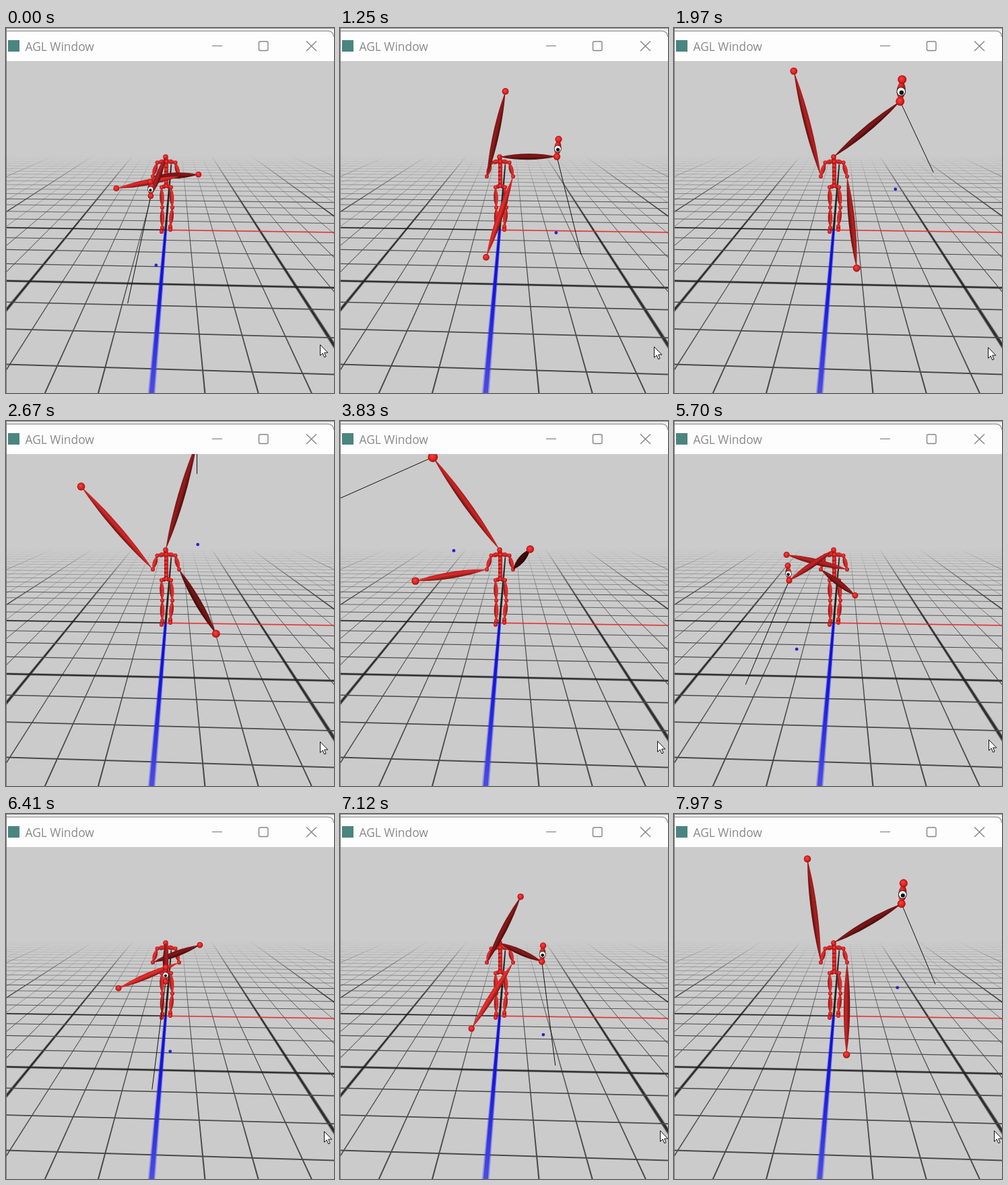
An HTML page with a canvas for the animation above (8000 ms loop, 487x541 px).

```html
<!DOCTYPE html>
<html lang="en">
<head>
<meta charset="utf-8">
<title>AGL Window</title>
<style>
  html, body { margin: 0; width: 100%; height: 100%; overflow: hidden; background: #cbcbcb; }
  canvas { display: block; }
</style>
</head>
<body>
<canvas id="stage" width="487" height="541"></canvas>
<script>
const W = 487, H = 541, TITLE_H = 49;
const LOOP = 8000, STEP = 142.5, PERIOD = 6180;
const stage = document.getElementById('stage').getContext('2d');
let ctx = stage;

const P = (x, y) => ({ x, y });

// ---------- motion: every joint runs round a circle seen in perspective ----------
// The picture holds for one STEP at a time.
const heldTime = t => Math.floor((t + 40) / STEP) * STEP - 20;

const wave = (mid, swing, peakDegrees) => t =>
  mid + swing * Math.cos(t / PERIOD * 2 * Math.PI - peakDegrees * Math.PI / 180);

function orbit(x, y, depth) {
  const distance = wave(1, depth, 0);
  return t => {
    const scale = 1 / distance(t);
    return { x: 243 + x(t) * scale, y: 295 + y(t) * scale, scale };
  };
}

const leftHand = orbit(wave(-40, 91, 11.5), wave(-111, 110, -79.5), .14);
const rightHand = orbit(wave(-14.5, 77, 173), wave(-42, 101.5, 102.5), .15);
const headTip = orbit(wave(-21, 112.5, 95.3), wave(-140, 85, 4), .2);
const gazeEnd = orbit(wave(-63, 200.5, 94), wave(-14, 162, 4.6), .3);
const targetDot = orbit(wave(-10, 97.5, 96), wave(-25, 88, 6), .1);

const leftLight = wave(.74, -.2, 20);
const rightLight = wave(.66, .38, 40);
const headLight = wave(.72, -.2, 95);

// ---------- drawing helpers ----------
const red = s => `rgb(${Math.min(240, 232 * s)},${42 * s},${42 * s})`;

function line(a, b, color, width) {
  ctx.strokeStyle = color;
  ctx.lineWidth = width;
  ctx.beginPath();
  ctx.moveTo(a.x, a.y);
  ctx.lineTo(b.x, b.y);
  ctx.stroke();
}

function disc(x, y, r, fill) {
  ctx.fillStyle = fill;
  ctx.beginPath();
  ctx.arc(x, y, r, 0, 7);
  ctx.fill();
}

function ball({ x, y }, r) {
  const g = ctx.createRadialGradient(x - r * .2, y - r * .3, 0, x, y, r);
  g.addColorStop(0, '#ff4242');
  g.addColorStop(.65, '#e42020');
  g.addColorStop(1, '#921414');
  disc(x, y, r, g);
}

function bone(a, b, half, shade) {
  const len = Math.hypot(b.x - a.x, b.y - a.y), ctl = half * 4 / 3;
  ctx.save();
  ctx.translate(a.x, a.y);
  ctx.rotate(Math.atan2(b.y - a.y, b.x - a.x));
  if (b.x < a.x) ctx.scale(1, -1);
  const g = ctx.createLinearGradient(0, -half, 0, half);
  g.addColorStop(0, red(shade * .8));
  g.addColorStop(.4, red(shade * 1.05));
  g.addColorStop(1, red(shade * .5));
  ctx.fillStyle = g;
  ctx.beginPath();
  ctx.moveTo(0, 0);
  ctx.bezierCurveTo(len * .3, -ctl, len * .7, -ctl, len, 0);
  ctx.bezierCurveTo(len * .7, ctl, len * .3, ctl, 0, 0);
  ctx.fill();
  ctx.restore();
}

// ---------- ground ----------
function project(x, z) {
  const w = 1 - .0744 * z - .00268 * x;
  return P(253.3 + (34.8 * x - 16.3) / w, 109.8 + 189.5 / w);
}

// A flat strip on the ground, so that its width follows the perspective.
function strip(x0, z0, x1, z1, half, color) {
  const dx = x0 === x1 ? half : 0, dz = half - dx;
  ctx.fillStyle = color;
  ctx.beginPath();
  [[x0 - dx, z0 - dz], [x0 + dx, z0 + dz], [x1 + dx, z1 + dz], [x1 - dx, z1 - dz]]
    .forEach(([x, z]) => { const p = project(x, z); ctx.lineTo(p.x, p.y); });
  ctx.fill();
}

function softStrip(x0, z0, x1, z1, half, rgb) {
  strip(x0, z0, x1, z1, half, `rgba(${rgb},.45)`);
  strip(x0, z0, x1, z1, half * .6, `rgba(${rgb},.85)`);
}

function drawGround() {
  const FAR = 40, NEAR = 8.5, MINOR = '#4a4a4a';
  ctx.fillStyle = '#cbcbcb';
  ctx.fillRect(0, 0, W, H);
  for (let i = -FAR; i <= FAR; i++) {
    const rowVisible = i < NEAR;
    if (i % 4) {
      strip(i, -FAR, i, NEAR, .014, MINOR);
      if (rowVisible) line(project(-FAR, i), project(FAR, i), MINOR, 1 / (1 - .0744 * i));
    } else if (i) {
      softStrip(i, -FAR, i, NEAR, .055, '32,32,32');
      if (rowVisible) softStrip(-FAR, i, FAR, i, .06, '32,32,32');
    }
  }
  const fog = ctx.createLinearGradient(0, 188, 0, 300);
  [1, .72, .5, .33, .2, .1, .05, 0]
    .forEach((alpha, i) => fog.addColorStop(i / 7, `rgba(203,203,203,${alpha})`));
  ctx.fillStyle = fog;
  ctx.fillRect(0, 0, W, 300);

  softStrip(-FAR, 0, 0, 0, .075, '20,20,20');
  softStrip(0, 0, FAR, 0, .075, '226,40,40');
  softStrip(0, -14, 0, 0, .06, '12,12,12');
  const blue = ctx.createLinearGradient(0, 298, 0, H);
  blue.addColorStop(0, '#0c0cd8');
  blue.addColorStop(.4, '#1616e2');
  blue.addColorStop(1, '#4c4ce4');
  ctx.globalAlpha = .4;
  strip(0, 0, 0, NEAR, .07, blue);
  ctx.globalAlpha = 1;
  strip(0, 0, 0, NEAR, .045, blue);
}

// ---------- body ----------
const MID = 238, NECK = P(237, 191);
const wrist = side => P(237.5 + 19.5 * side, 220);

function chain(...joints) {
  joints.slice(1).forEach((p, i) => bone(joints[i], p, 3.3, 1.03));
  joints.forEach(p => ball(p, 3));
}

function drawBody() {
  const chest = P(MID, 197), pelvis = P(MID, 234);
  for (const side of [-1, 1]) {
    chain(chest, P(MID + 13.5 * side, 199.5), wrist(side));
    chain(pelvis, P(MID + 7 * side, 236), P(239.5 + 7.5 * side, 266),
      P(MID + 6 * side, 295 - side), P(237.5 + 6.5 * side, 300.5 - 1.5 * side));
  }
  chain(NECK, ...Array.from({ length: 7 }, (_, i) => P(MID, 198 + 6 * i)));
  ball(NECK, 3.8);
}

// ---------- window frame ----------
function drawTitleBar() {
  const GRAY = '#858585';
  ctx.fillStyle = '#fdfdfd';
  ctx.fillRect(0, 0, W, TITLE_H);
  ctx.fillStyle = '#ececec';
  ctx.fillRect(0, 0, W, 4);
  ctx.fillStyle = '#8c8c8c';
  ctx.fillRect(0, 0, W, 1);
  ctx.strokeStyle = '#a0a0a0';
  ctx.lineWidth = 1.4;
  ctx.beginPath();
  ctx.moveTo(0, 4.5);
  ctx.lineTo(478, 4.5);
  ctx.quadraticCurveTo(486, 4.5, 486.5, 13);
  ctx.stroke();

  ctx.fillStyle = '#4a8580';
  ctx.fillRect(3, 18, 17, 17);
  ctx.fillStyle = '#8a8a8a';
  ctx.font = '17.4px "Open Sans", sans-serif';
  ctx.fillText('AGL Window', 28.5, 34);

  line(P(306, 26.5), P(321, 26.5), GRAY, 1.2);
  ctx.lineWidth = 1.4;
  ctx.beginPath();
  ctx.roundRect(375.5, 20, 13.5, 13.5, 2);
  ctx.stroke();
  line(P(446, 19.5), P(461, 34), GRAY, 1.4);
  line(P(461, 19.5), P(446, 34), GRAY, 1.4);
  ctx.fillStyle = '#777';
  ctx.fillRect(0, 0, 1, H);
}

const backdrop = document.createElement('canvas');
backdrop.width = W;
backdrop.height = H;
ctx = backdrop.getContext('2d');
drawGround();
drawBody();
drawTitleBar();
ctx = stage;

// ---------- moving parts ----------
function limb(root, end, shade) {
  bone(root, end, 4.6 * (1 + end.scale) / 2, shade);
  ball(end, 5.1 * end.scale);
}

function drawEye(base, gaze) {
  const size = 21 + (250 - base.y) * .08;
  const top = P(base.x + (base.x - 237) * .03, base.y - size);
  const x = (base.x + top.x) / 2, y = base.y - size * .45;
  const angle = Math.atan2(gaze.y - y, gaze.x - x), shift = size * .05;
  bone(base, top, size * .2, 1);
  ball(top, size * .2);
  disc(x, y, size * .21, '#2a2020');
  disc(x, y, size * .18, '#f4f4f4');
  disc(x + Math.cos(angle) * shift, y + Math.sin(angle) * shift, size * .1, '#101010');
  ball(base, size * .2);
}

// Mouse drift: time, x, y.
const DRIFT = [[0, 466, 469], [2800, 466, 475], [3400, 472, 474], [5700, 467, 472], [6800, 475, 469], [LOOP, 475, 469]];

function drawCursor(t) {
  const i = DRIFT.findIndex(key => key[0] > t);
  const [t0, x0, y0] = DRIFT[i - 1], [t1, x1, y1] = DRIFT[i];
  const f = (t - t0) / (t1 - t0);
  ctx.save();
  ctx.translate(Math.round(x0 + (x1 - x0) * f) + .5, Math.round(y0 + (y1 - y0) * f) + .5);
  const arrow = new Path2D('M0 0V16L3.7 12.6L6.2 18.4L8.6 17.4L6.2 11.7H11.3Z');
  ctx.fillStyle = '#fff';
  ctx.fill(arrow);
  ctx.strokeStyle = '#111';
  ctx.lineWidth = 1;
  ctx.stroke(arrow);
  ctx.restore();
}

function draw(t) {
  const head = headTip(t), gaze = gazeEnd(t), target = targetDot(t);
  ctx.drawImage(backdrop, 0, 0);
  ctx.save();
  ctx.beginPath();
  ctx.rect(1, TITLE_H, W, H);
  ctx.clip();
  disc(target.x, target.y, 2.4, '#2424c8');
  limb(wrist(-1), leftHand(t), leftLight(t));
  limb(wrist(1), rightHand(t), rightLight(t));
  line(head, gaze, '#111', 1);
  limb(NECK, head, headLight(t));
  drawEye(head, gaze);
  ctx.restore();
  drawCursor(Math.max(0, t));
}

const start = performance.now();
function tick() {
  draw(heldTime((performance.now() - start) % LOOP));
  requestAnimationFrame(tick);
}
tick();
</script>
</body>
</html>
```
